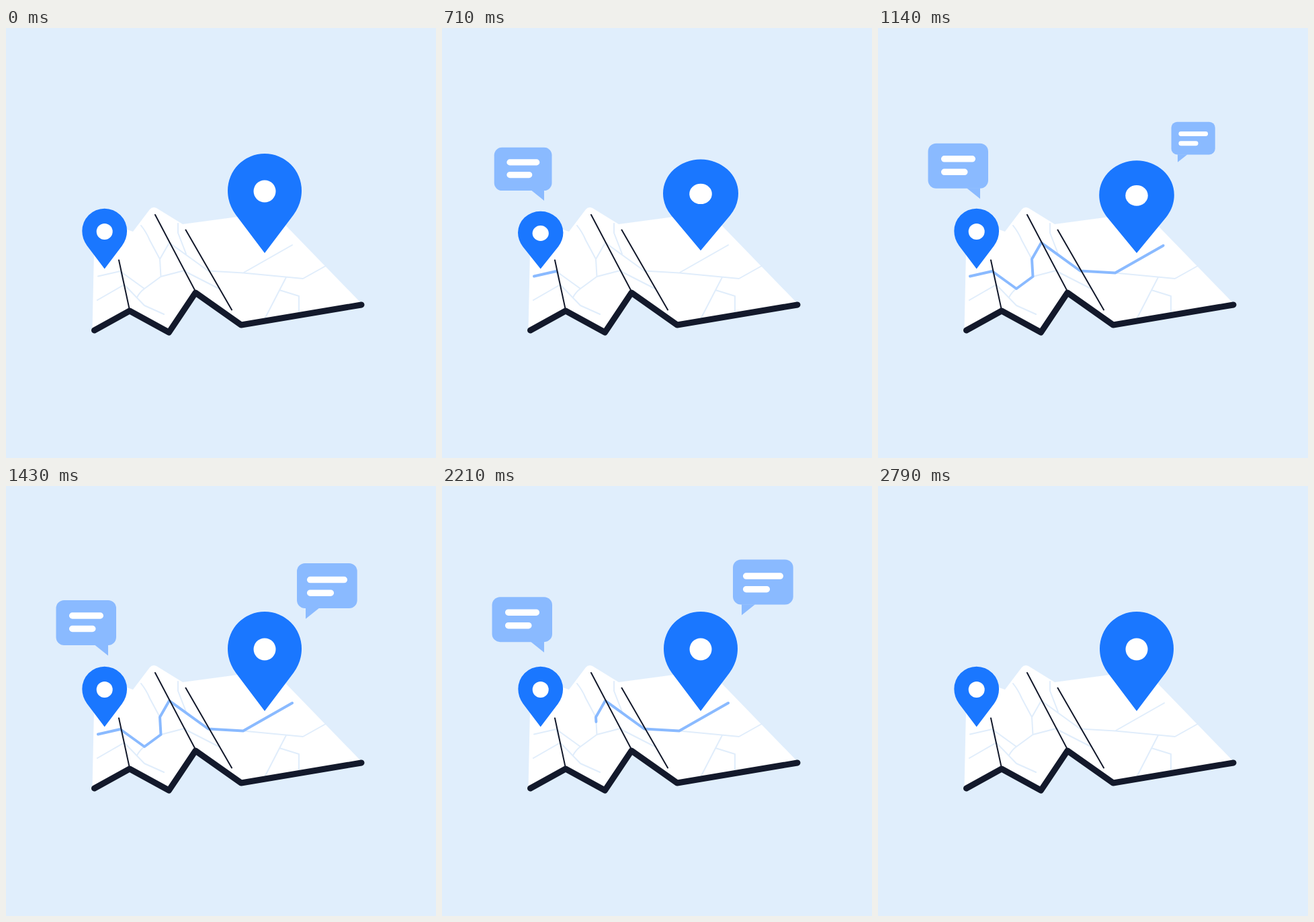
These frames come from a looping animation (640 by 640 pixels, 2.87 s). An HTML page:

```html
<!DOCTYPE html>
<html lang="en">
<head>
<meta charset="utf-8">
<title>Map route</title>
<style>
  html, body { margin: 0; width: 100%; height: 100%; overflow: hidden; background: #e0eefc; }
  svg { display: block; width: 100vw; height: 100vh; }
  .line { fill: none; stroke-linecap: round; stroke-linejoin: round; }
  .road { stroke: #e0edfb; stroke-width: 2; }
  .route { stroke: #8abaff; stroke-width: 4; }
  .fold { stroke: #13192b; stroke-width: 2; }
  .edge { stroke: #13192b; stroke-width: 9; }
  .pin { fill: #1a77ff; }
  .bubble { fill: #8abaff; }
  .words { stroke: #fff; stroke-width: 9.5; }
</style>
</head>
<body>
<svg viewBox="0 0 640 640">
  <defs>
    <path id="drop" class="pin" d="M0 0L-43-57C-51-68-55-80-55-93A55 55 0 1 1 55-93C55-80 51-68 43-57Z"/>
  </defs>

  <path fill="#fff" d="M128.5 448L132 288L145 288L189 303L214 270Q218 265 224 268L263 292L397 274L529 410L350 442L282 394L242 453L184 421Z"/>
  <path class="line road" d="M137 369.5L170 362L206 388L230.5 370L229 344L243 319.5L301 361.5L353 364.5L426 323
    M201 294Q209 304 214 316L229 344 M256 291V305L268 336
    M136 405L176 382L206 413L235 426 M170 362L176 382
    M195 401Q199 393 206 388 M230.5 370L267 360.5 M264 361L317 388
    M353 364.5L442 373L476 354 M386 431L417 371 M407 390L436 399V422"/>
  <path id="route" class="line route" d="M137 369.5L170 362L206 388L230.5 370L229 344L243 319.5L301 361.5L353 364.5L426 323"/>
  <path class="line fold" d="M168 345.5L184 420M222 278L282 392M267.5 300.5L336 419.5"/>
  <path class="line edge" d="M131.5 450L184 421L242.5 453L282 394L350 442L529 412"/>

  <g id="pinA"><use href="#drop" transform="scale(.607)"/><circle cy="-55.5" r="12" fill="#fff"/></g>
  <g id="pinB"><use href="#drop"/><circle cy="-92" r="16.5" fill="#fff"/></g>

  <g id="bubbleA">
    <path class="bubble" d="M-20-16L0 0V-16Z"/>
    <rect class="bubble" x="-77.5" y="-82.5" width="89.5" height="67" rx="12"/>
    <path class="line words" d="M-53.3-59.5H-11.7M-53.3-40H-23.2"/>
  </g>
  <g id="bubbleB">
    <path class="bubble" d="M20-16L0 0V-16Z"/>
    <rect class="bubble" x="-13" y="-82.7" width="89.7" height="67" rx="12"/>
    <path class="line words" d="M6.7-58.2H57.3M6.7-38.6H37.3"/>
  </g>
</svg>

<script>
const LOOP = 2870, FPS = 14, LAST = 39;
const $ = id => document.getElementById(id);
const clamp = u => Math.min(1, Math.max(0, u));
const span = (t, start, length) => clamp((t - start) / length);
const smooth = u => u * u * (3 - 2 * u);

// Timing curve with handles (.5, 0) and (.67, 1), solved by bisection.
function glide(u) {
  let lo = 0, hi = 1;
  for (let i = 0; i < 24; i++) {
    const v = (lo + hi) / 2, w = 1 - v;
    if (1.5 * v * w * w + 2.01 * v * v * w + v * v * v < u) lo = v; else hi = v;
  }
  return smooth(lo);
}

// time, scale x, scale y of a hop: crouch, stretch, land, settle
const HOP = [
  [40, 1, 1], [170, 1.05, .86], [360, .945, 1.05],
  [628, .975, 1], [670, 1.015, .93], [780, 1, 1]
];

function hopScale(t, axis) {
  if (t <= HOP[0][0]) return 1;
  for (let i = 1; i < HOP.length; i++) {
    const a = HOP[i - 1], b = HOP[i];
    if (t < b[0]) return a[axis] + (b[axis] - a[axis]) * smooth(span(t, a[0], b[0] - a[0]));
  }
  return 1;
}

function hopLift(t) {
  return t < 478
    ? 28.5 * Math.sin(span(t, 218, 260) * Math.PI / 2)
    : 28.5 * (1 - span(t, 478, 150) ** 2);
}

function drawPin(id, x, y, t) {
  $(id).setAttribute("transform",
    `translate(${x} ${y - hopLift(t)}) scale(${hopScale(t, 1)} ${hopScale(t, 2)})`);
}

function drawBubble(id, x, y, drift, t, start) {
  const s = smooth(span(t, start, 210)) * (1 - smooth(span(t, 2540, 210)));
  $(id).style.display = s > .001 ? "" : "none";
  $(id).setAttribute("transform", `translate(${x} ${y - drift * (t - 1430)}) scale(${s})`);
}

const route = $("route"), routeLength = route.getTotalLength();

function drawRoute(t) {
  const head = glide(span(t, 562, 605)), tail = glide(span(t, 1931, 605));
  const shown = (head - tail) * routeLength;
  route.style.display = shown > 0 ? "" : "none";
  route.setAttribute("stroke-dasharray", `${shown} ${routeLength * 2}`);
  route.setAttribute("stroke-dashoffset", -tail * routeLength);
}

function draw(now) {
  const step = Math.min(LAST, Math.floor((now % LOOP + 5) * FPS / 1000));
  const t = step * 1000 / FPS;
  drawRoute(t);
  drawPin("pinA", 146.7, 358.5, t);
  drawPin("pinB", 385, 335, t - 475);
  drawBubble("bubbleA", 152, 252.5, .0062, t, 530);
  drawBubble("bubbleB", 446, 197.8, .007, t, 1005);
}

const began = performance.now();
function tick() {
  draw(performance.now() - began);
  requestAnimationFrame(tick);
}
tick();
</script>
</body>
</html>
```
